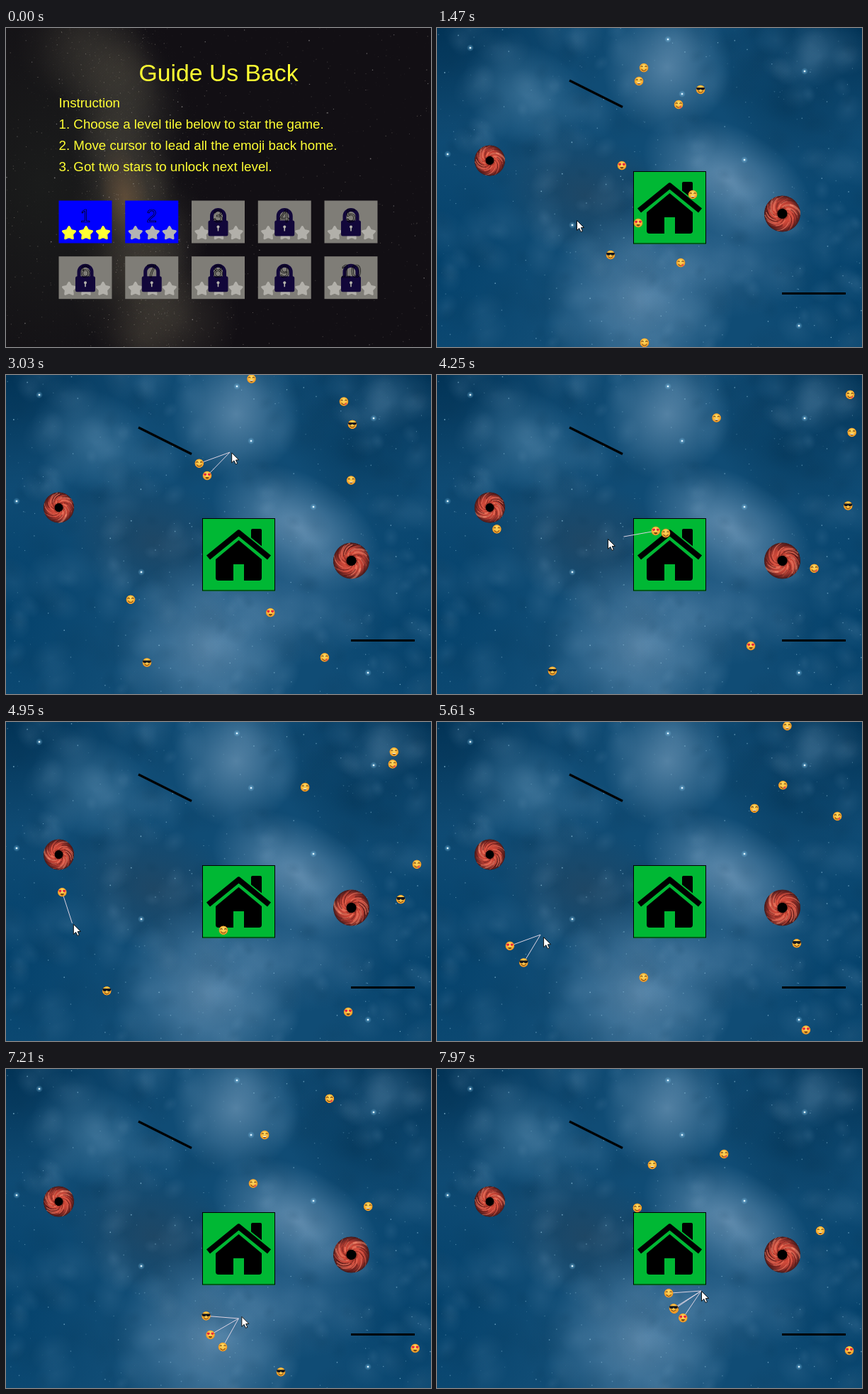
Animation, 600 px wide and 450 px high, one loop 8 s. Source, as an HTML page with a canvas:

```html
<!DOCTYPE html>
<html lang="en">
<head>
<meta charset="utf-8">
<title>Guide Us Back</title>
<style>
html, body { margin: 0; width: 100%; height: 100%; overflow: hidden; background: #000 }
canvas { display: block }
</style>
</head>
<body>
<canvas id="stage" width="600" height="450"></canvas>
<script>
const LOOP = 8000, GAME_START = 1150, TAU = Math.PI * 2;
const FONT = 'px "Liberation Sans", Arial, sans-serif';
const stage = document.getElementById('stage').getContext('2d');

let seed = 7;
const rand = () => (seed = seed * 16807 % 2147483647) / 2147483647;
const clamp = v => Math.min(1, Math.max(0, v));
const mix = (a, b, p) => a + (b - a) * p;

function layer(w, h, paint) {
  const c = document.createElement('canvas');
  c.width = w; c.height = h;
  paint(c.getContext('2d'));
  return c;
}
function disc(g, x, y, r, fill) {
  g.fillStyle = fill;
  g.beginPath(); g.arc(x, y, r, 0, TAU); g.fill();
}
function line(g, color, width, ...pts) {
  g.strokeStyle = color; g.lineWidth = width;
  g.beginPath();
  for (let i = 0; i < pts.length; i += 2) g.lineTo(pts[i], pts[i + 1]);
  g.stroke();
}
function box(g, x, y, w, h, r, fill) {
  g.fillStyle = fill;
  g.beginPath(); g.roundRect(x, y, w, h, r); g.fill();
}
// Soft elliptical cloud; color is #rrggbb
function cloud(g, x, y, rx, ry, color, alpha, turn = 0) {
  g.save();
  g.globalAlpha = alpha;
  g.translate(x, y); g.rotate(turn); g.scale(rx, ry);
  const grad = g.createRadialGradient(0, 0, 0, 0, 0, 1);
  grad.addColorStop(0, color);
  grad.addColorStop(.5, color + '80');
  grad.addColorStop(1, color + '00');
  disc(g, 0, 0, 1, grad);
  g.restore();
}

// ---- menu ----
function star(g, x, y, r, color) {
  g.fillStyle = g.strokeStyle = color;
  g.lineWidth = 3; g.lineJoin = 'round';
  g.beginPath();
  for (let i = 0; i < 10; i++) {
    const a = i * TAU / 10 - TAU / 4, d = i % 2 ? r * .54 : r;
    g.lineTo(x + d * Math.cos(a), y + d * Math.sin(a));
  }
  g.closePath(); g.fill(); g.stroke();
}
function padlock(g, x, y) {
  g.strokeStyle = '#12073a'; g.lineWidth = 5;
  g.beginPath();
  g.moveTo(x - 9, y + 30);
  g.arc(x, y + 22, 9, Math.PI, 0);
  g.lineTo(x + 9, y + 30); g.stroke();
  box(g, x - 14, y + 28, 28, 22, 2.5, '#12073a');
  disc(g, x, y + 37, 2, '#b5b3ab');
  g.fillRect(x - .8, y + 37, 1.6, 6);
}
const menu = layer(600, 450, g => {
  g.fillStyle = '#120f14'; g.fillRect(0, 0, 600, 450);
  cloud(g, 50, 220, 230, 330, '#202420', .6);
  for (let y = 20; y < 450; y += 12) {
    const x = 130 + y * .22 + (rand() - .5) * 60, size = 40 + rand() * 55;
    cloud(g, x, y, size, size, rand() < .5 ? '#4a443a' : '#3a3833', .3);
  }
  cloud(g, 168, 240, 35, 75, '#8a6642', .45, -.2);
  for (let i = 0; i < 3500; i++) {
    const y = rand() * 450, band = i % 2;
    const x = band ? 130 + y * .22 + (rand() + rand() - 1) * 120 : rand() * 600;
    g.fillStyle = `rgba(210,200,185,${.04 + .4 * rand() ** 5})`;
    g.fillRect(x, y, 1, 1);
  }
  for (let i = 0; i < 75; i++) disc(g, rand() * 600, rand() * 450, .4 + rand() * .5, '#c9c6c480');

  g.fillStyle = '#ffff33';
  g.textAlign = 'center'; g.font = 33.75 + FONT;
  g.fillText('Guide Us Back', 300, 75);
  g.textAlign = 'left'; g.font = 18.75 + FONT;
  ['Instruction',
   '1. Choose a level tile below to star the game.',
   '2. Move cursor to lead all the emoji back home.',
   '3. Got two stars to unlock next level.'
  ].forEach((s, i) => g.fillText(s, 74.5, 112 + 30 * i));

  g.textAlign = 'center'; g.font = 26 + FONT;
  for (let n = 0; n < 10; n++) {
    const x = 74.5 + 93.75 * (n % 5), y = n < 5 ? 243.5 : 322.2, open = n < 2;
    g.fillStyle = open ? '#0000ff' : '#7f7d77';
    g.fillRect(x, y, 75, 60);
    for (let k = 0; k < 3; k++)
      star(g, x + 14.5 + 24 * k, y + 46, 9, n == 0 ? '#ffff33' : open ? '#b4b4b4' : '#b2b0aa');
    if (!open) padlock(g, x + 37.5, y);
    g.strokeStyle = '#000'; g.lineWidth = .7;
    g.strokeText(n + 1, x + 37.5, y + 30);
  }
});

// ---- game scenery ----
function house(g) {
  g.fillStyle = '#00b834'; g.fillRect(277, 202, 103, 103);
  g.strokeStyle = '#000'; g.lineWidth = 1;
  g.strokeRect(277.5, 202.5, 102, 101.5);
  box(g, 346, 217, 15, 30, 2, '#000');
  g.lineJoin = 'round';
  line(g, '#00b834', 14, 284, 260, 328, 224, 373, 260);
  line(g, '#000', 8, 285.5, 257.5, 328.5, 222.5, 371.5, 257.5);
  g.fillStyle = '#000';
  g.beginPath();
  g.moveTo(296, 260); g.lineTo(328.5, 233); g.lineTo(361, 260);
  g.arcTo(361, 290, 336, 290, 4); g.lineTo(336, 290);
  g.lineTo(336, 267); g.lineTo(321, 267); g.lineTo(321, 290);
  g.arcTo(296, 290, 296, 260, 4);
  g.fill();
}
const space = layer(600, 450, g => {
  g.fillStyle = '#104c75'; g.fillRect(0, 0, 600, 450);
  for (const x of [0, 600]) {
    cloud(g, x, 0, 210, 160, '#003052', .9);
    cloud(g, x, 330, 160, 200, '#02406a', .85);
  }
  cloud(g, 490, 115, 120, 60, '#053a5e', .7, .5);
  cloud(g, 210, 235, 130, 90, '#24455f', .7, .3);
  cloud(g, 325, 55, 90, 95, '#6a93b3', .75, .4);
  cloud(g, 125, 95, 95, 70, '#4f84a8', .6, .5);
  cloud(g, 410, 215, 130, 75, '#6f98b9', .85, .5);
  cloud(g, 285, 385, 135, 130, '#6793b6', .85, .5);
  cloud(g, 400, 320, 140, 90, '#44769d', .55);
  cloud(g, 540, 40, 70, 40, '#467699', .5, -.4);
  for (let i = 0; i < 260; i++) {
    const r = 8 + rand() * 24;
    cloud(g, rand() * 600, rand() * 450, r * 1.3, r, i % 2 ? '#8fb4d2' : '#042c48', .1, rand() * 3);
  }
  for (let i = 0; i < 420; i++)
    disc(g, rand() * 600, rand() * 450, .35 + rand() * .55, `rgba(160,210,235,${.1 + .6 * rand() ** 2})`);
  for (const [x, y] of [[47, 28], [326, 16], [519, 61], [346, 93], [15, 178], [434, 186], [191, 278], [511, 420]]) {
    cloud(g, x, y, 5, 5, '#8fd8ff', .55);
    disc(g, x, y, 1.3, '#dff3ff');
  }
  house(g);
  line(g, '#000', 3.2, 187, 74, 262, 111.5);
  line(g, '#000', 3, 487, 374.5, 577, 374.5);
});

const vortex = layer(104, 104, g => {
  g.translate(52, 52);
  const grad = g.createRadialGradient(0, 0, 8, 0, 0, 51);
  grad.addColorStop(0, '#5d1712');
  grad.addColorStop(.3, '#d54b3a');
  grad.addColorStop(.65, '#b23c32');
  grad.addColorStop(1, '#451a1b');
  disc(g, 0, 0, 51, grad);
  g.beginPath(); g.arc(0, 0, 51, 0, TAU); g.clip();
  for (let arm = 0; arm < 60; arm++) {
    const pts = [], start = rand() * TAU, from = 12 + rand() * 22;
    for (let r = from; r < from + 24; r += 3) {
      const a = start + r * .045;
      pts.push(r * Math.cos(a), r * Math.sin(a));
    }
    line(g, ['#ff967a70', '#4a121270', '#e05a4870'][arm % 3], 1 + rand() * 3, ...pts);
  }
  disc(g, 0, 0, 14, '#000');
});
function hole(x, y, r, t) {
  stage.save();
  stage.translate(x, y); stage.rotate(t / 1000);
  stage.drawImage(vortex, -r, -r, 2 * r, 2 * r);
  stage.restore();
}

// ---- emoji ----
function heart(g, x, y) {
  for (const side of [-1.7, 1.7]) disc(g, x + side, y, 2.4, '#e8283c');
  g.beginPath(); g.moveTo(x - 3.9, y + 1); g.lineTo(x + 3.9, y + 1); g.lineTo(x, y + 5); g.fill();
}
const faces = {};
for (const kind of ['smile', 'open', 'yum', 'cool', 'love'])
  faces[kind] = layer(28, 28, g => {
    g.translate(14, 14);
    const grad = g.createRadialGradient(0, -5, 2, 0, 0, 13);
    grad.addColorStop(0, '#ffdb62'); grad.addColorStop(.65, '#fdb73a'); grad.addColorStop(1, '#e98a1c');
    disc(g, 0, 0, 12.5, grad);
    const ink = '#7a4812';
    for (const x of [-5.7, 5.7]) {
      if (kind == 'cool') box(g, x - 6, -6, 12, 7.5, [1, 1, 5, 5], '#15171c');
      else if (kind == 'love') heart(g, x, -4);
      else {
        g.strokeStyle = ink; g.lineWidth = 2;
        g.beginPath(); g.arc(x, -2, 2.4, Math.PI, 0); g.stroke();
      }
    }
    g.beginPath();
    if (kind == 'open' || kind == 'love') {
      g.arc(0, 4, 5, 0, Math.PI); g.fillStyle = ink; g.fill();
      if (kind == 'open') { g.fillStyle = '#fff'; g.fillRect(-4.5, 4, 9, 2); }
    } else {
      g.arc(0, 1, 7, .35, Math.PI - .35);
      g.strokeStyle = ink; g.lineWidth = 2; g.stroke();
    }
    if (kind == 'yum') disc(g, 5, 7, 3, '#e8554c');
  });

// ---- motion ----
const LEASH = 46, CATCH_TIME = 200, POINTER_LEAD = 40;

// Points the mouse passes: [time, x, y]
const MOUSE = [[250, 491, 449], [770, 197, 271], [1700, 197, 271], [3030, 316, 109], [4100, 330, 215],
  [4250, 264, 228], [4500, 125, 245], [4850, 92, 280], [5610, 146, 300], [6450, 247, 391], [7970, 373, 313]];

function segment(keys, t) {
  let i = 0;
  while (i < keys.length - 2 && t >= keys[i + 1][0]) i++;
  return [i, clamp((t - keys[i][0]) / (keys[i + 1][0] - keys[i][0]))];
}
// Smooth curve through the points, without overshoot
function mouseAt(t) {
  const [i, p] = segment(MOUSE, t), a = MOUSE[i], b = MOUSE[i + 1], dt = b[0] - a[0], q = 1 - p;
  const slope = (k, c) => {
    const l = MOUSE[k - 1], m = MOUSE[k], n = MOUSE[k + 1];
    if (!l || !n || (m[c] - l[c]) * (n[c] - m[c]) <= 0) return 0;
    return (n[c] - l[c]) / (n[0] - l[0]);
  };
  return [1, 2].map(c => a[c] * q * q * (1 + 2 * p) + b[c] * p * p * (3 - 2 * p)
    + dt * p * q * (q * slope(i, c) - p * slope(i + 1, c)));
}

// Each flies from (x, y) at time `at` with (vx, vy) px/s.
// `leash` holds [time, degrees]: where it hangs around the mouse once caught.
const emoji = (face, x, y, vx, vy, more) =>
  ({ face, x, y, vx, vy, at: 1470, from: GAME_START, until: LOOP, ...more });
const EMOJI = [
  emoji('open', 285, 75, 39.4, -45.1),
  emoji('yum', 341, 108, 87.1, -45.2),
  emoji('open', 361, 235, 80.8, -55.4),
  emoji('yum', 344, 331, 67.8, 102.9),
  emoji('smile', 293, 444, -75, -81.5, { until: 4490 }),
  emoji('love', 284, 275, 57.2, 38.5, { until: 7550 }),
  emoji('love', 558, 381, 57.2, 38.5, { at: 7550, from: 7550 }),
  emoji('smile', 292, 56, -10, 65, { until: 4220, leash: [[2600, 130], [3030, 160], [4220, 260]] }),
  emoji('smile', 323, 223, -23, 101, { at: 4250, from: 4220, leash: [[6250, 55], [6450, 62], [7970, 176]] }),
  emoji('cool', 372, 87, 74.9, -94, { leash: [[7600, 97], [7970, 146]] }),
  emoji('cool', 245, 320, -29.5, 54.8, { leash: [[5400, 110], [5610, 121], [6450, 221], [7970, 148]] }),
  emoji('love', 261, 194, -50, 30, { leash: [[2300, 117], [3030, 134], [4250, 350], [5610, 160], [6450, 176], [7970, 124]] }),
];

// Reflect a straight path between the stage edges
function bounce(v, size) {
  const edge = 5, span = size - 2 * edge, m = ((v - edge) % (2 * span) + 2 * span) % (2 * span);
  return edge + (m > span ? 2 * span - m : m);
}
function place(e, t, mouse) {
  const s = (t - e.at) / 1000, caught = e.leash && t >= e.leash[0][0];
  let x = bounce(e.x + e.vx * s, 600), y = bounce(e.y + e.vy * s, 450);
  if (caught) {
    const [i, p] = segment(e.leash, t), pull = clamp((t - e.leash[0][0]) / CATCH_TIME);
    const angle = mix(e.leash[i][1], e.leash[i + 1][1], p) * TAU / 360;
    x = mix(x, mouse[0] + LEASH * Math.cos(angle), pull);
    y = mix(y, mouse[1] + LEASH * Math.sin(angle), pull);
  }
  return { face: faces[e.face], x, y, caught };
}

function drawCursor(x, y) {
  const g = stage;
  g.save();
  g.translate(x + .5, y + .5);
  g.beginPath();
  for (const [px, py] of [[0, 0], [0, 14], [3.3, 11], [5.6, 16], [8, 15], [5.8, 10.2], [10, 10]]) g.lineTo(px, py);
  g.closePath();
  g.fillStyle = '#fff'; g.fill();
  g.strokeStyle = '#111'; g.lineWidth = 1; g.lineJoin = 'miter'; g.stroke();
  g.restore();
}

function draw(t) {
  const playing = t >= GAME_START;
  stage.drawImage(playing ? space : menu, 0, 0);
  if (playing) {
    hole(74.5, 187, 22, t);
    hole(487.5, 262, 26, t);
    const mouse = mouseAt(t);
    const shown = EMOJI.filter(e => t >= e.from && t < e.until).map(e => place(e, t, mouse));
    for (const e of shown) if (e.caught) line(stage, '#dcd3e2', 1, ...mouse, e.x, e.y);
    for (const e of shown) stage.drawImage(e.face, e.x - 7, e.y - 7, 14, 14);
  }
  if (t >= 250) drawCursor(...mouseAt(t + POINTER_LEAD));
}

function tick() {
  draw(performance.now() % LOOP);
  requestAnimationFrame(tick);
}
tick();
</script>
</body>
</html>
```
